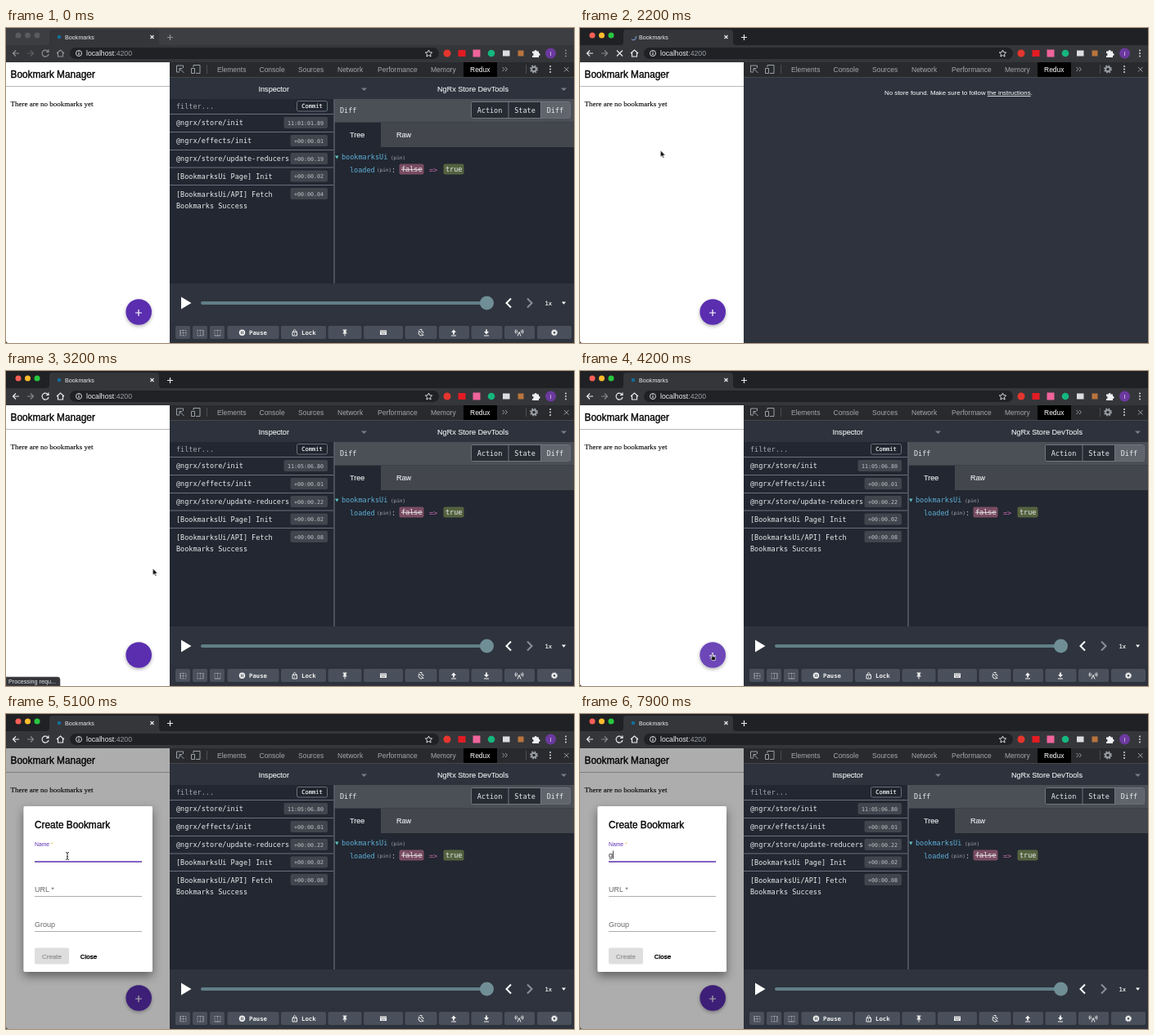
These frames come from a looping animation (694x386 px, 8000 ms). An HTML page:

```html
<!DOCTYPE html>
<html lang="en">
<head>
<meta charset="utf-8">
<title>Bookmarks</title>
<style>
html, body { margin: 0; width: 100%; height: 100%; overflow: hidden; background: #202124; }
svg { display: block; width: 694px; height: 386px; }
text { font-family: "Liberation Sans", Arial, sans-serif; fill: #e8eaed; white-space: pre; }
.mono text, text.mono { font-family: "DejaVu Sans Mono", monospace; font-size: 8.5px; }
.mono .sans text { font-family: "Liberation Sans", Arial, sans-serif; font-size: 9.1px; stroke: #e8eaed; stroke-width: .15px; }
.mid { text-anchor: middle; }
.medium { stroke: currentColor; stroke-width: .35px; }
.line { fill: none; stroke: #e8eaed; stroke-width: 1.2; }
.tabs text { font-size: 8.5px; fill: #a5a8ac; }
.page text { fill: #000; color: #000; }
.head { font-size: 11.85px; }
.page .serif { font: 9px "Liberation Serif", Times, serif; stroke: #000; stroke-width: .12px; }
.stamps rect { fill: #40454e; }
.mono .stamps text { font-size: 6.65px; fill: #c2c4c8; text-anchor: end; }
.mono text.pin { font-size: 6px; fill: #a9adb5; }
.mono text.key { fill: #5fb0d8; }
.buttons rect { fill: #4a505b; }
.mono .buttons text { font-size: 7.3px; font-weight: bold; fill: #f0f0f0; }
.buttons .line { stroke: #f0f0f0; stroke-width: 1; }
.buttons .grid { stroke: #b9bdc4; stroke-width: .8; }
.field { font-size: 9px; }
.page .field { fill: #666; }

/* every animation shares one 8 s clock */
.dim, .lit, .wake, .go, .stop, .store, .empty, .first, .second, .plus, .hover,
.status, .arrow, .hand, .beam, .typed, .caret { animation: 8s step-end infinite; }
.dim { animation-name: dim; }
.lit { animation-name: lit; }
.wake { animation-name: wake; }
.go { animation-name: go; }
.stop { animation-name: stop; }
.store { animation-name: store; }
.empty { animation-name: empty; }
.first { animation-name: first; }
.second { animation-name: second; }
.plus { animation-name: plus; }
.hover { animation-name: hover; }
.status { animation-name: status; }
.arrow { animation-name: arrow; }
.hand { animation-name: hand; }
.beam { animation-name: beam; }
.typed { animation-name: typed; }
.caret { animation-name: caret; }
.spin { transform-origin: 65px 11px; animation: spin 1s linear infinite; }
.shade { animation: shade 8s linear infinite; }
.dialog { transform-origin: 100px 214px; animation: dialog 8s ease-out infinite; }
.pointer { animation: pointer 8s ease-in-out infinite; }

@keyframes dim { 0% { opacity: 1 } 11.25%, 100% { opacity: 0 } }
@keyframes lit { 0% { opacity: 0 } 11.25%, 100% { opacity: 1 } }
@keyframes wake { 0% { opacity: .5 } 11.25%, 100% { opacity: 1 } }
@keyframes go { 0% { opacity: 1 } 20% { opacity: 0 } 36.25%, 100% { opacity: 1 } }
@keyframes stop { 0% { opacity: 0 } 20% { opacity: 1 } 36.25%, 100% { opacity: 0 } }
@keyframes store { 0% { opacity: 1 } 22.5% { opacity: 0 } 35%, 100% { opacity: 1 } }
@keyframes empty { 0% { opacity: 0 } 22.5% { opacity: 1 } 35%, 100% { opacity: 0 } }
@keyframes first { 0% { opacity: 1 } 22.5%, 100% { opacity: 0 } }
@keyframes second { 0% { opacity: 0 } 22.5%, 100% { opacity: 1 } }
@keyframes plus { 0% { opacity: 1 } 35% { opacity: 0 } 42.5%, 100% { opacity: 1 } }
@keyframes hover { 0% { opacity: 0 } 48.75% { opacity: .12 } 57.5%, 100% { opacity: 0 } }
@keyframes status { 0% { opacity: 0 } 37.5% { opacity: 1 } 42.5%, 100% { opacity: 0 } }
@keyframes arrow { 0% { opacity: 0 } 1.25% { opacity: 1 } 48.75%, 100% { opacity: 0 } }
@keyframes hand { 0% { opacity: 0 } 48.75% { opacity: 1 } 57.5%, 100% { opacity: 0 } }
@keyframes beam { 0% { opacity: 0 } 57.5% { opacity: 1 } 93.75%, 100% { opacity: 0 } }
@keyframes typed { 0% { opacity: 0 } 93.75%, 100% { opacity: 1 } }
@keyframes caret {
  0% { opacity: 0; transform: none }
  66.25% { opacity: 1 } 72.5% { opacity: 0 } 78.75% { opacity: 1 } 85% { opacity: 0 }
  91.25% { opacity: 1; transform: none }
  93.75%, 100% { opacity: 1; transform: translateX(5px) }
}
@keyframes spin { to { transform: rotate(360deg) } }
@keyframes shade { 0%, 56.25% { opacity: 0 } 61.25%, 100% { opacity: .32 } }
@keyframes dialog {
  0%, 56.25% { opacity: 0; transform: scale(.7) }
  58.125%, 100% { opacity: 1; transform: none }
}
@keyframes pointer {
  0%, 1.25% { transform: translate(-12px, 84px) }
  11.25%, 31.25% { transform: translate(98.5px, 150px) }
  40%, 42.5% { transform: translate(179.5px, 242px) }
  50%, 55% { transform: translate(161px, 346px) }
  62.5%, 100% { transform: translate(75px, 174px) }
}
</style>
</head>
<body>
<svg viewBox="0 0 694 386">
  <defs>
    <filter id="soft" x="-30%" y="-30%" width="160%" height="170%">
      <feDropShadow dx="0" dy="1.700" stdDeviation="2" flood-opacity=".32"/>
    </filter>
    <filter id="deep" x="-20%" y="-20%" width="140%" height="150%">
      <feDropShadow dx="0" dy="5" stdDeviation="6" flood-opacity=".45"/>
    </filter>
    <clipPath id="view"><path d="M0 42H200V386H3Q0 386 0 383Z"/></clipPath>
  </defs>

  <!-- browser frame -->
  <rect width="694" height="386" fill="#202124"/>
  <rect class="dim" width="694" height="21" fill="#3c3e41"/>
  <path d="M49 21Q53 21 53 17V6Q53 2 57 2H183Q187 2 187 6V17Q187 21 191 21H694V42H0V21Z" fill="#35363a"/>
  <g class="dim" fill="#595b5e"><circle cx="15" cy="9" r="3.5"/><circle cx="26.5" cy="9" r="3.5"/><circle cx="38" cy="9" r="3.5"/></g>
  <g class="lit">
    <circle cx="15" cy="9" r="3.5" fill="#fe5f57"/><circle cx="26.5" cy="9" r="3.5" fill="#febc2e"/><circle cx="38" cy="9" r="3.5" fill="#28c840"/>
  </g>
  <circle class="go" cx="65" cy="11" r="2.3" fill="#126f9c"/>
  <g class="stop"><path class="spin" d="M65 7.500A3.500 3.500 0 0 1 67 14" fill="none" stroke="#8ab4f8"/></g>
  <text x="72" y="13.700" font-size="7.200">Bookmarks</text>
  <path class="line" d="M176.500 9l4 4m0-4l-4 4"/>
  <g class="wake">
    <path class="line" d="M197 11.500h7m-3.500-3.500v7"/>
    <path class="line" d="M16 31H8.500m3.500-3.500L8.500 31l3.500 3.500"/>
    <path class="line" d="M26 31h7.500m-3.500-3.500l3.500 3.500l-3.500 3.500" style="stroke:#85878b"/>
    <path class="line go" d="M51.500 29A4 4 0 1 0 52 32M52 26.500v3h-3"/>
    <path class="line stop" d="M45 27.500l7 7m0-7l-7 7"/>
    <path class="line" d="M62 31l4.500-4l4.500 4M63.500 30v5h6v-5"/>
    <g id="dots" fill="#e8eaed"><circle cx="684" cy="27.500" r=".9"/><circle cx="684" cy="31" r=".9"/><circle cx="684" cy="34.500" r=".9"/></g>
  </g>
  <rect x="78" y="24" width="451" height="14" rx="7" fill="#202124"/>
  <circle class="line" cx="89" cy="31" r="3.5" style="stroke-width:.9"/>
  <path class="line" d="M89 30.500v2.500m0-4.500v1"/>
  <text x="98" y="34" font-size="8.700">localhost<tspan fill="#9aa0a6">:4200</tspan></text>
  <path class="line" style="stroke-width:.9" d="M516.500 27l1.200 2.700l3 .3l-2.200 2l.6 3l-2.600-1.500l-2.600 1.500l.6-3l-2.200-2l3-.3Z"/>
  <circle cx="539" cy="31" r="4.500" fill="#e5362e"/>
  <rect x="552.500" y="27" width="9" height="8" fill="#e31b23"/>
  <rect x="570.500" y="26.500" width="9" height="9" fill="#ef649c"/>
  <circle cx="593" cy="31" r="4.300" fill="#15b77e"/>
  <rect x="607" y="27.500" width="8.500" height="7" fill="#dddddf"/>
  <rect x="625.500" y="27.500" width="7" height="7" fill="#b9743d"/>
  <path d="M643 28.500h2.500a1.600 1.600 0 0 1 3.200 0h2.300v2.300a1.600 1.600 0 0 1 0 3.200v2h-8v-2a1.600 1.600 0 0 0 0-3.200Z" fill="#eef0f2"/>
  <circle cx="665.500" cy="31" r="6.500" fill="#6b399f"/><text class="mid" x="665.500" y="33.500" font-size="7">I</text>

  <!-- developer tools -->
  <rect x="200" y="42" width="494" height="344" fill="#2e333e"/>
  <rect x="200" y="42" width="494" height="18" fill="#292a2d"/>
  <path d="M200 60.500H694" stroke="#44464a"/>
  <rect x="559" y="42" width="41" height="18"/>
  <g class="line" style="stroke:#9aa0a6;stroke-width:1">
    <path d="M212 54h-3.500v-8h8v3M212 49.500l5.500 5.500M212 53v-3.500h3.500"/>
    <path d="M229 55.500h-2.500v-6h4v6h-2M229 48v-2.500h8v10h-5"/>
    <path d="M245.500 45v11M635.500 45v11" stroke="#4b4d51"/>
    <path d="M606.500 48l2.500 2.500l-2.500 2.500m3.500-5l2.500 2.500l-2.500 2.500"/>
    <circle cx="645" cy="50.500" r="2.800" stroke-width="2"/><circle cx="645" cy="50.500" r="4.300" stroke-width="1.500" stroke-dasharray="1.700 1.700"/>
    <path d="M682 48l5.500 5.500m0-5.500l-5.500 5.500"/>
  </g>
  <use href="#dots" x="-19" y="19.500"/>
  <g class="tabs">
    <text x="258" y="53.500">Elements</text><text x="309.500" y="53.500">Console</text><text x="357" y="53.500">Sources</text>
    <text x="405" y="53.500">Network</text><text x="454" y="53.500">Performance</text><text x="519" y="53.500">Memory</text>
    <text x="567" y="53.500" style="fill:#fff">Redux</text>
  </g>

  <text class="empty" x="372" y="82" font-size="7.870" style="fill:#fff">No store found. Make sure to follow <tspan text-decoration="underline">the instructions</tspan>.</text>

  <g class="store mono">
    <rect x="200" y="61" width="494" height="26" fill="#2d323c"/>
    <g class="sans"><text x="308.500" y="77.500">Inspector</text><text x="527" y="77.500">NgRx Store DevTools</text></g>
    <path d="M434 73.500h7l-3.500 3.500ZM678 73.500h7l-3.500 3.500Z" fill="#777d87"/>

    <!-- action list -->
    <rect x="200" y="87" width="200" height="226" fill="#222731"/>
    <text x="208" y="99" style="fill:#a3a7ae">filter...</text>
    <rect x="355.500" y="89.500" width="37" height="12.500" rx="2" fill="#1f242d" stroke="#6a717c"/>
    <text class="mid" x="374" y="98.300" style="font-size:7px;stroke:#e8eaed;stroke-width:.2px">Commit</text>
    <path d="M200 105.500H400M200 127.500H400M200 149.500H400M200 171H400M200 192.500H400" stroke="#69717c"/>
    <text x="208" y="119">@ngrx/store/init</text>
    <text x="208" y="141">@ngrx/effects/init</text>
    <text x="208" y="163">@ngrx/store/update-reducers</text>
    <text x="208" y="185">[BookmarksUi Page] Init</text>
    <text x="208" y="206.500">[BookmarksUi/API] Fetch</text>
    <text x="208" y="220.500">Bookmarks Success</text>
    <g class="stamps">
      <rect x="339.500" y="109" width="53.500" height="14" rx="2"/>
      <rect x="347.500" y="131" width="45.500" height="14" rx="2"/><rect x="347.500" y="153" width="45.500" height="14" rx="2"/>
      <rect x="347.500" y="174.500" width="45.500" height="14" rx="2"/><rect x="347.500" y="196" width="45.500" height="14" rx="2"/>
      <text x="388" y="140.500">+00:00.01</text><text x="388" y="184">+00:00.02</text>
      <g class="first"><text x="388" y="118.500">11:01:01.89</text><text x="388" y="162.500">+00:00.19</text><text x="388" y="205.500">+00:00.04</text></g>
      <g class="second"><text x="388" y="118.500">11:05:06.80</text><text x="388" y="162.500">+00:00.22</text><text x="388" y="205.500">+00:00.08</text></g>
    </g>

    <!-- diff panel -->
    <rect x="400" y="87" width="294" height="226" fill="#222731"/>
    <rect x="401" y="87" width="293" height="28" fill="#4b4f56"/>
    <rect x="458" y="115" width="236" height="31" fill="#43474d"/>
    <path d="M401 115.500H694" stroke="#3b4048"/>
    <path d="M401 87V313" stroke="#59616b" stroke-width="1.500"/>
    <text x="408" y="103.500">Diff</text>
    <rect x="568.500" y="90.500" width="121" height="20" rx="2" fill="#262b34" stroke="#72777f"/>
    <path d="M654 91h33.500q2 0 2 2v15.500q0 2-2 2H654Z" fill="#60656d"/>
    <path d="M614 91v19.500M653.500 91v19.500" stroke="#72777f"/>
    <text class="mid" x="591" y="103.500">Action</text><text class="mid" x="634" y="103.500">State</text><text class="mid" x="671" y="103.500">Diff</text>
    <g class="sans"><text x="420" y="133.500">Tree</text><text x="477" y="133.500">Raw</text></g>
    <path d="M402 156.500h4.500l-2.250 4Z" fill="#5fc2c2"/>
    <text class="key" x="410" y="161">bookmarksUi</text><text class="pin" x="470" y="160.500">(pin)</text>
    <text class="key" x="420" y="176.500">loaded</text><text class="pin" x="453" y="176">(pin)</text><text x="471" y="176.500" style="fill:#b8bcc2">:</text>
    <rect x="480.500" y="166.500" width="30" height="13" rx="2" fill="#794c62"/>
    <text x="483" y="176" text-decoration="line-through">false</text>
    <text x="517" y="176.500" style="fill:#c66bae">=&gt;</text>
    <rect x="534.500" y="166.500" width="25" height="13" rx="2" fill="#53623f"/>
    <text x="537" y="176">true</text>

    <!-- playback -->
    <rect x="200" y="313" width="494" height="47" fill="#2e333d"/>
    <path d="M214 329.500L226.500 337L214 344.500Z" fill="#fff"/>
    <path d="M240 337H587" stroke="#617f88" stroke-width="4" stroke-linecap="round"/>
    <circle cx="587.500" cy="337" r="8.500" fill="#708e96"/>
    <path class="line" d="M617 331.500l-5.500 5.500l5.500 5.500" style="stroke:#fff;stroke-width:2"/>
    <path class="line" d="M637 331.500l5.500 5.500l-5.500 5.500" style="stroke:#8a9098;stroke-width:2"/>
    <text x="658.500" y="339.500" style="font-size:7px;fill:#fff;stroke:#fff;stroke-width:.15px">1x</text>
    <path d="M679 335.500h5l-2.500 3.200Z" fill="#fff"/>

    <!-- tool row -->
    <rect x="200" y="360" width="494" height="26" fill="#2d323c"/>
    <g class="buttons">
      <rect x="207" y="365" width="18" height="16" rx="2"/><rect x="228" y="365" width="18" height="16" rx="2"/><rect x="249" y="365" width="18" height="16" rx="2"/>
      <rect x="270.500" y="365" width="63" height="16" rx="2"/><rect x="336" y="365" width="55" height="16" rx="2"/><rect x="393.500" y="365" width="41" height="16" rx="2"/>
      <rect x="437" y="365" width="48" height="16" rx="2"/><rect x="487.500" y="365" width="39" height="16" rx="2"/><rect x="529" y="365" width="37" height="16" rx="2"/>
      <rect x="568.500" y="365" width="38" height="16" rx="2"/><rect x="609" y="365" width="37" height="16" rx="2"/><rect x="649" y="365" width="42" height="16" rx="2"/>
      <path class="line grid" stroke-dasharray="1 1" d="M213 370.500h7v6.500h-7M216.500 370v7M213 373.500h7M234 370.500h7M234 377h7M237.500 370v7M234 370v7M255 370.500h7M255 370v7M262 370v7M258.500 370v7"/>
      <path class="line grid" d="M213 370v7M241 370v7M255 377h7"/>
      <circle cx="288.500" cy="373.300" r="3.700" fill="#f0f0f0"/><path d="M287.500 371.500v3.600m2-3.600v3.600" stroke="#4a505b"/>
      <text x="297" y="376">Pause</text>
      <path class="line" d="M350 372.500h5.500v4.500h-5.500ZM351 372.500v-1.500q1.700-3 3.400 0v1.500M352.700 374v1.500"/>
      <text x="361" y="376">Lock</text>
      <path d="M411.500 369.500h5v1h-1v2.500l1.500 1.500h-2.500v3h-1v-3H411l1.500-1.500v-2.500h-1Z" fill="#f0f0f0"/>
      <rect x="457" y="370.500" width="8" height="5.500" style="fill:#f0f0f0"/><path d="M458 372.300h6M459 374.500h4" stroke="#4a505b" stroke-dasharray="1 .7"/>
      <path class="line" d="M504 370.500l6.500 6.500M505.500 369.500h3M505 371.500a3 3 0 1 0 4.500 4.500M507 371a3 3 0 0 1 3 3"/>
      <path d="M547 369.500l3 3.500h-2v2.500h-2V373h-2ZM544 376.500h6v1h-6ZM587 375.500l3-3.500h-2v-2.500h-2V372h-2ZM584 376.500h6v1h-6Z" fill="#f0f0f0"/>
      <path class="line" d="M625 377.500l2-5l2 5M624.500 370.500q-1 1.500 0 3M629.500 370.500q1 1.500 0 3M623 369.500q-2 2.500 0 5M631 369.500q2 2.500 0 5"/>
      <circle class="line" cx="670" cy="373.300" r="2.300" style="stroke-width:1.800"/><circle class="line" cx="670" cy="373.300" r="3.600" stroke-dasharray="1.400 1.400"/>
    </g>
  </g>

  <!-- web page -->
  <g class="page" clip-path="url(#view)">
    <rect y="42" width="200" height="344" fill="#fff"/>
    <text class="head medium" x="5.500" y="60.500">Bookmark Manager</text>
    <path d="M0 71.500H200" stroke="#b9b9b9"/>
    <text class="serif" x="5.500" y="95.500">There are no bookmarks yet</text>
    <circle cx="162.200" cy="348" r="15.800" fill="#5a2faf" filter="url(#soft)"/>
    <circle class="hover" cx="162.200" cy="348" r="15.800" fill="#fff"/>
    <path class="plus" d="M158 349h8m-4-4v8" stroke="#fff" stroke-width="1.200"/>
    <rect class="shade" y="42" width="200" height="344"/>
    <g class="dialog">
      <rect x="21.500" y="113" width="157.500" height="203" rx="2" fill="#fff" filter="url(#deep)"/>
      <text class="head medium" x="35" y="139.500">Create Bookmark</text>
      <text x="35" y="162" font-size="6.800" style="fill:#5a2faf">Name <tspan fill="#e8c54a">*</tspan></text>
      <path d="M35 181H166" stroke="#5a2faf" stroke-width="1.300"/>
      <text class="field typed" x="35" y="175.500" style="fill:#222">g</text>
      <path class="caret" d="M35.500 167.500v10" stroke="#222" stroke-width=".8"/>
      <text class="field" x="35" y="217.500">URL *</text>
      <text class="field" x="35" y="260.500">Group</text>
      <path d="M35 223.500H166M35 266.500H166" stroke="#999" stroke-width=".8"/>
      <rect x="35" y="286.500" width="42" height="20" rx="2" fill="#dedede"/>
      <text class="mid medium" x="56" y="299.500" font-size="8" style="fill:#a0a0a0;color:#a0a0a0">Create</text>
      <text class="mid medium" x="101" y="299.500" font-size="8">Close</text>
    </g>
  </g>

  <g class="status">
    <path d="M0 375H63q3 0 3 3v8H0Z" fill="#35363a" stroke="#55575b" stroke-width=".6"/>
    <text x="3" y="383" font-size="7.200">Processing requ...</text>
  </g>

  <g class="pointer">
    <path class="arrow" d="M0 0v8l1.800-1.600l1.300 2.900l1.200-.5l-1.300-2.900h2.500Z" fill="#000" stroke="#fff" stroke-width=".5"/>
    <path class="hand" d="M0 1q.8-1 1.400 0v2.700l2.500.6q.9.300.8 1.300l-.6 3H.5L-1.700 5.700q.4-1 1.700 0Z" fill="#111" stroke="#fff" stroke-width=".7"/>
    <path class="beam" d="M-2-4.500q2 0 2 1.500q0-1.500 2-1.500M0-3v6M-2 4.500q2 0 2-1.500q0 1.500 2 1.500M-1 .8h2" fill="none" stroke="#222" stroke-width=".9"/>
  </g>
</svg>
</body>
</html>
```
